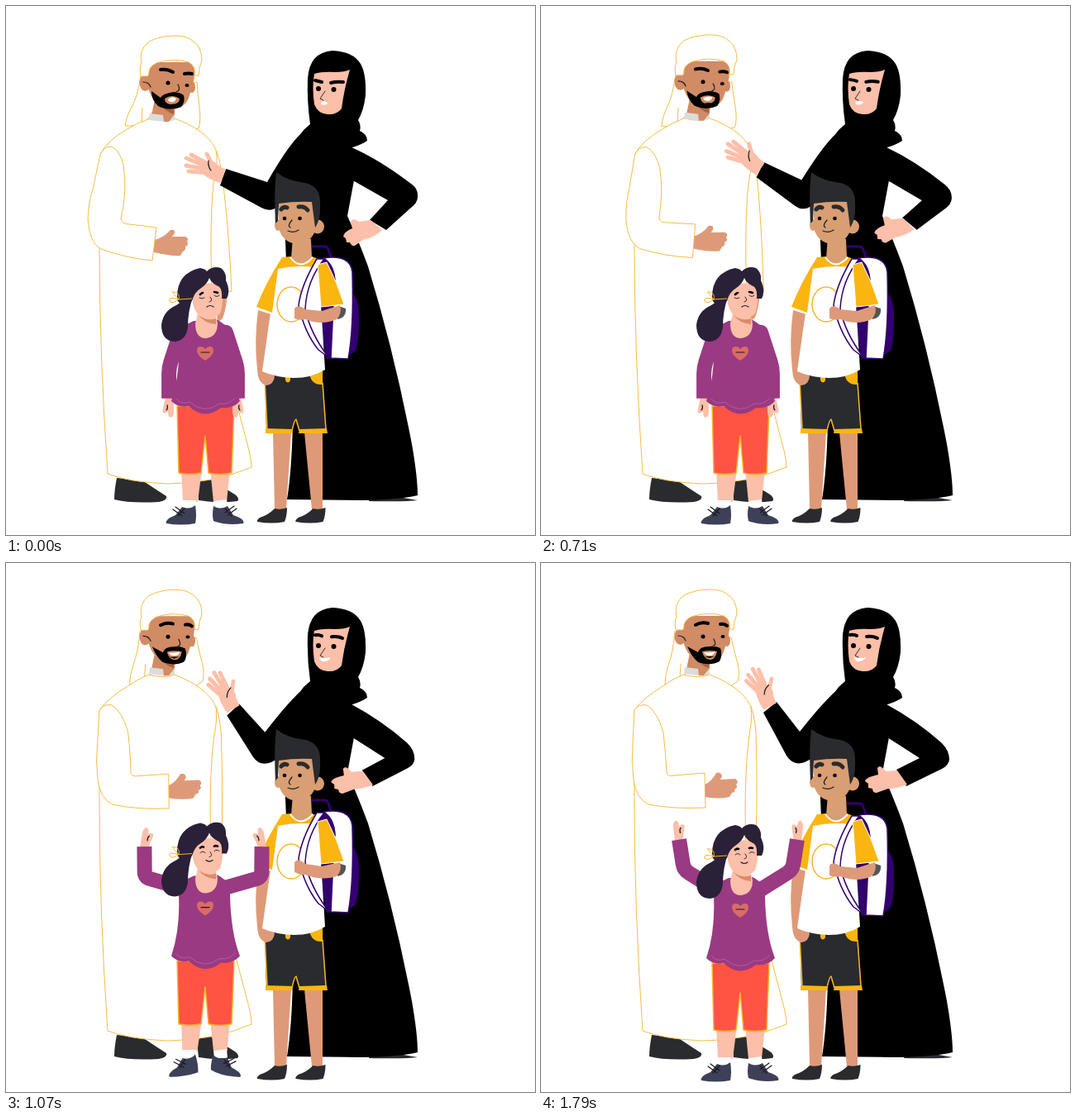
Recreate the animation shown at these times as an HTML page. Size 640 by 640 pixels, loop 2.87 s.

```html
<!DOCTYPE html>
<html lang="en">
<head>
<meta charset="utf-8">
<title>Family</title>
<style>
html, body { margin: 0; width: 100%; height: 100%; overflow: hidden; background: #fff; }
svg { display: block; width: 100vw; height: 100vh; }
path, ellipse, circle { stroke-linejoin: round; }
.robe { fill: #fff; stroke: #f5b93c; stroke-width: .95; }
.brown { fill: #d18b65; }
.tan { fill: #d99e72; }
.arm { fill: #de9a78; }
.pink { fill: #fcbfa9; }
.dark { fill: #292b2e; }
.gold { fill: #fbb510; }
.indigo { fill: #33006f; }
.plum { fill: #9a3a82; }
.hair { fill: #2a2038; }
.shoe { fill: #3e4058; }
.white { fill: #fff; }
.line { fill: none; stroke: #1b1b1f; stroke-width: 1.2; stroke-linecap: round; }
.thin { stroke-width: .9; }
.brow { fill: none; stroke: #000; stroke-width: 4; stroke-linecap: round; }
.sleeve { fill: none; stroke: #9a3a82; stroke-width: 18; }
.trim { fill: none; stroke: #f5b52a; stroke-width: 1.5; }
.strap { fill: #fff; stroke: #33006f; stroke-width: 1.5; }
</style>
</head>
<body>
<svg viewBox="0 0 640 640">
  <!-- father -->
  <g>
    <path class="dark" d="M134 571Q131 586 131 597Q150 602 185 600Q196 598 194 593Q183 586 165 574Z"/>
    <path class="dark" d="M230 571L233 598Q258 602 280 599Q283 596 277 591L248 573Z"/>
    <path class="robe" data-by="p" d="M163 84Q159 112 150 126Q145 136 144 145L166 145L190 110L231 92Q232 108 234 122Q236 140 233 148L222 150L190 130"
      data-to="M162 82Q160 108 154 124Q150 136 150 147L168 146L190 108L230 90Q234 108 238 122Q241 136 238 143L228 150L190 130"/>
    <path class="robe" data-by="p" d="M165 123L164 141" data-to="M169 122L168 138"/>
    <path class="arm" data-by="p" d="M257 345L267 346Q268 362 262 378L255 384Z" data-to="M249 342L258 342Q257 360 252 374L246 380Z"/>
    <path class="robe" data-by="p" d="M174 136Q160 141 148 148Q122 163 114 179L113 290Q113 420 123 566Q148 576 195 578Q250 578 297 558Q297 548 292 530Q284 500 266 430L240 350L273 345Q269 262 262 210Q258 180 253 172Q242 150 204 136Q190 141 174 136Z"
      data-to="M172 135Q158 141 146 150Q124 163 113 178L113 290Q113 420 123 566Q148 576 195 578Q250 578 297 558Q297 548 292 530Q284 500 266 430L240 350L260 345Q262 262 260 205Q258 181 253 172Q242 150 204 135Q190 140 172 135Z"/>
    <path class="robe" style="fill:none" data-by="p" d="M254 175Q257 190 252 208Q246 250 249 346" data-to="M254 173Q256 188 252 208Q245 260 248 346"/>
    <path class="arm" data-by="p" d="M179 283Q190 281 199 271Q205 270 204 275L201 279L217 279Q222 281 219 285Q222 289 217 291Q218 295 214 297L211 302Q200 303 179 298Z"
      data-to="M198 268Q206 265 212 254Q218 252 219 258L217 262L235 261Q240 264 236 268Q239 272 234 274Q236 277 231 278L228 283Q216 286 198 283Z"/>
    <path class="robe" data-by="p" d="M114 180Q118 170 127 170Q137 173 142 192Q147 224 139 257Q140 264 149 264L182 268L177 308Q145 305 115 294Q101 287 99 258Q100 236 105 222Z"
      data-to="M113 178Q118 170 128 172Q141 180 148 205Q151 232 152 253Q153 259 162 257L198 254L199 296Q160 298 130 292Q115 285 112 262Q109 240 111 218Z"/>
    <g data-by="p" transform="translate(0 0)" data-to="translate(0 -4)">
      <path class="brown" d="M181 108L176 132L190 136L190 140L197 140L204 132L205 118Z"/>
      <path d="M186 117Q194 127 203 125L203 131Q192 128 186 117Z" fill="#a8633f"/>
      <path d="M174 130L173 138L191 140L190 132ZM197 140L204 138L204 131Z" fill="#dcdcdc"/>
      <ellipse class="brown" cx="168.500" cy="93" rx="7" ry="10"/>
      <ellipse class="brown" cx="225" cy="98" rx="4" ry="7"/>
      <path class="brown" d="M172 68L228 68Q230 88 222 108Q218 124 200 125Q177 122 172 98Z"/>
      <path class="line" d="M166 92Q173 92 175 98"/>
      <path class="robe" d="M163 85Q161 75 164 69Q160 53 173 43Q187 36 205 36Q219 36 227 43Q237 50 237 66Q233 75 233 84L228 84Q230 73 221 68Q203 62 182 69Q174 73 173 79Q173 86 170 85Z"/>
      <path data-by="p" d="M176 103Q176 114 184 121Q198 128 212 122Q217 116 215 108Q212 105 203 104Q189 106 187 111Z" data-to="M177 105Q182 117 190 124Q205 129 216 123Q220 116 217 107Q211 104 203 105Q192 105 190 112Z"/>
      <path class="brown" data-by="p" d="M192 112Q201 106 210 112Q210 119 200 119Q192 119 192 112Z" data-to="M195 111Q204 109 213 111Q211 121 204 121Q197 120 195 111Z"/>
      <path data-by="p" d="M195 121Q201 117 206 120L200 124Z" data-to="M198 117Q204 117 210 117L204 119Z"/>
      <path class="white" data-by="p" d="M196 113Q201 108 206 112Q204 117 200 116Q196 116 196 113Z" data-to="M197 112Q204 113 211 111Q209 116 204 116Q199 116 197 112Z"/>
      <path class="brow" data-by="p" d="M187 77Q195 76 202 80" data-to="M187 79Q194 75 202 77"/>
      <path class="brow" data-by="p" d="M216 82Q221 81 225 82" data-to="M217 78Q222 77 225 80"/>
      <circle cx="196" cy="93" r="2.500"/>
      <ellipse data-by="p" cx="219" cy="96" rx="2.500" ry="2" transform="translate(0 0)" data-to="translate(1 -3)"/>
      <path class="line" data-by="p" d="M208 95Q212 102 206 104" data-to="M209 96Q213 104 208 104"/>
    </g>
  </g>

  <!-- mother -->
  <g>
    <path class="dark" d="M439 598Q446 594 475 594L498 598Q485 600 439 599Z"/>
    <path data-by="p" d="M400 168L418 171Q452 186 490 215Q499 221 498 231Q498 238 490 244L460 271L440 259L462 235L416 209Z"
      data-to="M400 168L418 171Q455 191 485 218Q494 227 494 238Q493 245 485 249L442 270L430 250L458 236L416 209Z"/>
    <path d="M360 150L418 165L421 211L413 254Q425 280 438 315Q470 420 491 530Q498 570 498 592Q478 597 430 598L340 597Q346 560 347 500L338 285Q337 220 345 172Z"/>
    <path class="pink" data-by="p" d="M441 259L455 271Q446 280 432 283L422 290Q418 291 416 286L412 286L411 281L408 279Q409 273 419 269L417 261Q420 255 427 261Z"
      data-to="M431 251L443 268Q431 273 420 273L406 278Q401 278 401 273L396 272L396 267L392 264Q393 259 408 256L407 248Q410 243 417 252Z"/>
    <path data-by="w" d="M362 150Q345 162 316 213L266 197L259 217L309 244Q320 250 328 243L400 200Z"
      data-to="M362 150Q344 165 314 207L275 177L263 193L303 237Q311 247 324 242L400 200Z|M362 150Q343 166 313 204L285 168L269 181L297 233Q305 246 319 241L400 200Z"/>
    <g data-by="w" transform="translate(0 0) rotate(0 262 207)" data-to="translate(7 -22) rotate(28 262 207)|translate(14 -33) rotate(39 262 207)">
      <path d="M246 192L224 180M244 195L218 184M244 198L218 193M246 202L221 200M253 199L243 179" fill="none" stroke="#fcbfa9" stroke-width="5" stroke-linecap="round"/>
      <path class="pink" d="M240 189Q252 185 257 193L266 198L259 214Q246 210 238 203Z"/>
      <path class="line" d="M245 187Q244 194 248 199"/>
    </g>
    <path d="M395 54Q420 55 429 70Q436 82 435 108Q433 126 426 138Q430 144 428 151Q437 155 437 163Q430 168 416 172L360 150L368 143Q364 115 365 88Q367 56 395 54Z"/>
    <path class="pink" d="M373 82Q383 79 398 80Q410 80 416 77Q409 101 406 124Q400 132 389 131Q377 130 373 119Q370 98 373 82Z"/>
    <path class="brow" data-by="p" d="M374 90Q378 91 382 92" data-to="M374 87Q379 86 382 88"/>
    <path class="brow" data-by="p" d="M393 93Q400 91 408 92" data-to="M394 89Q402 88 407 91"/>
    <circle cx="378" cy="100" r="3"/>
    <circle cx="396.500" cy="101" r="3"/>
    <path class="line thin" d="M386 103L380 112L384 114"/>
    <path class="white" data-by="p" d="M381 117Q385 113 389 117Q388 121 381 119Z" data-to="M378 114Q385 116 393 114Q390 120 382 119Z"/>
  </g>

  <!-- boy -->
  <g>
    <path class="arm" d="M323 516L345 516L339 609L325 609ZM361 516L383 516L383 609L370 609Z"/>
    <path id="boot" class="dark" d="M325 608Q317 616 307 619Q303 622 304 624Q322 627 337 624Q340 617 340 607Q332 610 325 608Z"/>
    <use href="#boot" x="46.500"/>
    <path class="dark" d="M313 445L383 445L388 516L355 516L350 502L346 516L315 516Z"/>
    <path class="trim" d="M313 452L316 512M383 456L387 512M346 514Q349 500 351 500L355 514"/>
    <path class="gold" d="M314 511L347 512L346 517L314 517ZM355 512L388 511L389 517L354 517ZM367 444L383 440L383 458Q369 459 367 444ZM338 448h6v5q-3 5 -6 0Z"/>
    <path class="arm" d="M305 368L321 373Q317 400 315 430L325 448Q324 458 315 459Q305 457 304 440Q300 405 305 368Z"/>
    <g data-by="b" transform="translate(0 0)" data-to="translate(0 -4)">
      <path d="M370 291L387 291Q391 294 393 305" fill="none" stroke="#33006f" stroke-width="3"/>
      <path class="indigo" d="M376 306L392 306L410 426L388 427Q382 400 382 370ZM417 346Q428 352 427 380Q427 410 422 418L413 424Z"/>
      <path class="strap" d="M384 305Q417 300 419 322Q421 390 414 427L393 426L397 340Q400 315 384 305Z"/>
      <path class="indigo" d="M379 306Q398 310 399 335L384 320Z"/>
    </g>
    <path class="white" d="M329 314L378 313L386 440Q370 450 348 450Q325 449 310 442L318 385Z"/>
    <path class="gold" d="M334 304L345 303Q357 318 370 303L378 306L374 316Q350 313 329 318L322 371L303 364Q314 335 334 304Z"/>
    <path class="tan" d="M347 280L345 305Q357 320 370 304L369 282Z"/>
    <path d="M344 304Q356 321 371 304" fill="none" stroke="#fff" stroke-width="2"/>
    <ellipse class="trim" cx="345" cy="361" rx="17" ry="21"/>
    <g data-by="b" transform="translate(0 0)" data-to="translate(0 -4)">
      <path class="strap" d="M376 306Q357 338 354 362Q361 395 378 416L390 425Q367 394 362 366Q364 332 385 306Z"/>
    </g>
    <path class="gold" d="M377 313L388 310Q401 335 409 361L381 364Z" stroke="#fff"/>
    <path d="M402 363L411 366Q412 377 401 379Z" fill="#555"/>
    <path class="arm" data-by="b" d="M404 362L382 369L362 367Q353 360 349 366L349 378Q356 381 362 379Q382 387 400 379Q407 372 404 362Z" data-to="M404 362L382 367L362 364Q353 356 349 362L349 374Q356 378 362 377Q382 385 400 379Q407 372 404 362Z"/>
    <ellipse class="tan" cx="329" cy="265" rx="4" ry="7"/>
    <ellipse class="tan" cx="377" cy="267" rx="8" ry="8.500"/>
    <path class="tan" d="M329 235L373 235L375 270Q369 286 355 288Q337 288 331 272Z"/>
    <path class="dark" d="M327 201Q341 212 362 214Q381 218 380 240Q381 258 374 268L370 237Q350 236 330 239L329 260L326 263Q324 225 327 201Z"/>
    <path class="brow" style="stroke:#292b2e;stroke-width:5" d="M333 246Q336 242 340 244M354 243Q361 242 365 247"/>
    <circle cx="337" cy="257" r="2.300"/>
    <circle cx="355.500" cy="257" r="2.300"/>
    <path class="line" d="M346 259Q340 266 344 268M341 272Q348 275 354 271"/>
  </g>

  <!-- girl -->
  <g>
    <path class="pink" data-by="j" d="M212 560L237 560L232 600L214 600ZM247 560L271 560L267 600L251 600Z" data-to="M212 548L237 548L231 584L213 584ZM247 548L271 548L268 584L251 584Z"/>
    <g data-by="j" transform="translate(0 0)" data-to="translate(0 -15)">
      <path class="white" d="M214 598L230 598L230 608L214 608ZM251 599L267 597L268 608L252 608Z"/>
      <g data-by="foot" transform="rotate(0 226 604)" data-to="rotate(-15 226 604)">
        <path class="shoe" d="M229 604Q231 616 229 626Q212 629 194 626Q192 621 205 616L213 606Q222 610 229 604Z"/>
        <path class="line" d="M205 606L216 614M202 609L213 617M208 617L216 608"/>
      </g>
      <g data-by="foot" transform="rotate(0 254 604)" data-to="rotate(15 254 604)">
        <path class="shoe" d="M251 605Q249 616 251 623Q266 629 287 626Q290 621 275 616L268 605Q259 610 251 605Z"/>
        <path class="line" d="M276 605L265 613M279 608L268 616M273 617L265 608"/>
      </g>
    </g>
    <path data-by="j" d="M207 484L276 484L273 565Q260 568 245 565L241 520L236 565Q222 568 209 565Z" data-to="M207 480L276 480L273 553Q260 556 245 553L241 508L236 553Q222 556 209 553Z" fill="#ff5343" stroke="#f9b52c" stroke-width="1.500"/>
    <g data-by="j" transform="translate(0 0)" data-to="translate(0 -4)">
      <g id="arms"></g>
      <path class="plum" d="M227 381Q209 388 209 404Q211 445 200 478Q209 487 221 484Q240 502 260 486Q274 488 283 478Q272 450 271 404Q272 388 256 380Z"/>
      <path d="M206 475Q212 483 222 479Q240 495 258 481Q270 483 277 474" fill="none" stroke="#b45aa0"/>
      <path class="pink" d="M232 372L229 384Q229 402 242 402Q256 400 256 384L253 372Z"/>
      <path d="M233 374Q244 382 254 378L254 385Q240 384 233 374Z" fill="#d98c6a"/>
      <path d="M241 429Q228 421 232 413Q238 410 241 415Q245 410 250 413Q254 421 241 429Z" fill="#d96c66"/>
      <path class="line" d="M236 419H246"/>
      <path class="hair" d="M226 352Q220 370 220 388Q218 405 204 406Q188 405 188 386Q190 369 206 362Q213 358 215 352Z"/>
      <path class="pink" d="M226 346Q240 328 261 340Q264 358 259 372Q252 379 240 378Q229 374 226 360Z"/>
      <path class="hair" d="M207 352Q207 323 235 317Q241 318 243 321Q250 314 260 317Q267 322 266 332Q272 345 267 354L261 354Q262 342 257 339Q249 336 246 329Q243 337 235 342Q228 346 225 357L214 361Q207 360 207 352Z"/>
      <path class="trim" style="stroke-width:1" d="M209 355Q198 343 203 346Q211 347 209 355Q196 351 198 357Q201 361 209 355L225 354"/>
      <path class="brow" style="stroke-width:2.600" data-by="q" d="M235 349Q237 347 238 347M252 346Q254 346 256 347" data-to="M235 347Q237 345 239 346M252 345Q254 344 256 345"/>
      <path class="line thin" data-by="q" d="M234 353Q237 355 240 353M252 350Q255 353 258 350" data-to="M235 353Q238 350 241 353M252 351Q255 348 258 351"/>
      <path class="line thin" d="M247 352Q251 357 246 358"/>
      <path class="line" data-by="q" d="M243 364Q247 361 251 364" data-to="M242 362Q246 365 250 362"/>
    </g>
  </g>
</svg>
<script>
const LOOP = 2870, FPS = 14;

// rows: tick, upper arm angle, forearm angle, hand turn
const ARMS = [
  [10, 108, 90, 0],
  [13, 181, 272, 18],
  [17, 211, 267, 8],
  [20, 211, 261, 6],
  [25, 212, 261, 5]
];
const KEYS = {
  q: [[10, 0], [13, 1]],
  j: [[13, 0], [15, .6], [17, 1], [20, 0]],
  foot: [[12, 0], [13, .2], [17, 1], [20, 0]],
  b: [[10, 0], [13, 1], [17, 1], [20, 0]]
};

const lerp = (a, b, u) => a + (b - a) * u;
const clamp = u => Math.max(0, Math.min(1, u));

function sample(rows, tick) {
  const i = rows.findIndex(r => r[0] > tick);
  if (i === 0) return rows[0].slice(1);
  if (i < 0) return rows[rows.length - 1].slice(1);
  const a = rows[i - 1], b = rows[i], u = (tick - a[0]) / (b[0] - a[0]);
  return a.slice(1).map((v, k) => lerp(v, b[k + 1], u));
}

// Blend the numbers of two equally built strings.
function mix(a, b, u) {
  const to = b.match(/-?\d*\.?\d+/g);
  let i = 0;
  return a.replace(/-?\d*\.?\d+/g, n => lerp(+n, +to[i++], u).toFixed(2));
}

const parts = [...document.querySelectorAll('[data-to]')].map(el => {
  const attr = el.hasAttribute('d') ? 'd' : 'transform';
  return { el, attr, by: el.dataset.by, poses: [el.getAttribute(attr), ...el.dataset.to.split('|')] };
});

const arms = [[-1, 211], [1, 266]].map(([side, x]) => {
  const g = document.createElementNS('http://www.w3.org/2000/svg', 'g');
  g.innerHTML = `<g><path class="pink" d="M-5 2L-6 -14Q-6 -23 -2 -23Q1 -23 1 -16L5 -18Q9 -18 7 -12L4 2Z"/>
    <path class="line" d="M2 -8Q1 -12 3 -14"/></g><path class="sleeve"/>`;
  document.getElementById('arms').append(g);
  return { side, x, hand: g.firstChild, sleeve: g.lastChild };
});

function drawArm({ side, x, hand, sleeve }, [up, fore, turn]) {
  const reach = (p, deg, len) => {
    const a = deg * Math.PI / 180;
    return [p[0] - side * Math.cos(a) * len, p[1] + Math.sin(a) * len];
  };
  const s = [x, 395], e = reach(s, up, 45), w = reach(e, fore, 37);
  const near = reach(s, up, 38), far = reach(e, fore, 7);
  sleeve.setAttribute('d', `M${x - side * 12} 393L${s}L${near}Q${e} ${far}L${w}`);
  hand.setAttribute('transform', `translate(${w}) scale(${-side} 1) rotate(${fore - 270 + turn})`);
}

function draw(now) {
  const tick = Math.floor((now % LOOP + 5) * FPS / 1000);
  const p = (1 - Math.cos(Math.PI * clamp((tick - 6) / 11))) / 2;
  const level = { p, w: p < .72 ? p / 1.44 : .5 + (p - .72) / .56 };
  for (const k in KEYS) level[k] = sample(KEYS[k], tick)[0];

  for (const { el, attr, by, poses } of parts) {
    const u = level[by] * (poses.length - 1);
    const i = Math.min(Math.floor(u), poses.length - 2);
    el.setAttribute(attr, mix(poses[i], poses[i + 1], u - i));
  }
  const pose = sample(ARMS, tick);
  arms.forEach(arm => drawArm(arm, pose));
}

const start = performance.now();
function loop() {
  draw(performance.now() - start);
  requestAnimationFrame(loop);
}
loop();
</script>
</body>
</html>
```
